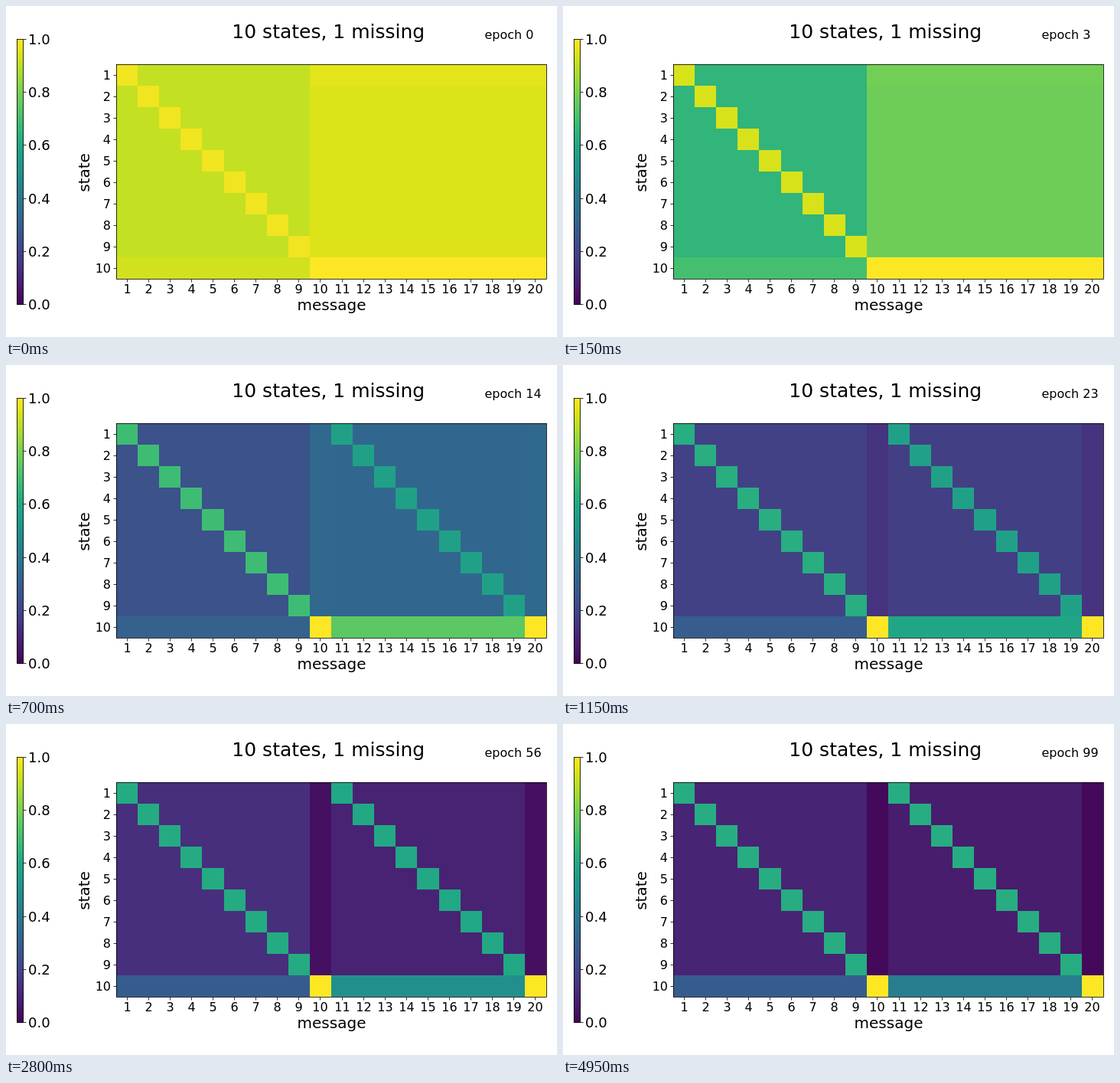
Recreate the animation shown at these times as an HTML page. Size 720 by 432 pixels, loop 5 s.

```html
<!DOCTYPE html>
<html lang="en">
<head>
<meta charset="utf-8">
<title>10 states, 1 missing</title>
<style>
  html, body { margin: 0; width: 100%; height: 100%; overflow: hidden; background: #fff; }
  svg { display: block; font-family: "DejaVu Sans", sans-serif; font-size: 16px; }
  .line { fill: none; stroke: #000; stroke-width: .8; }
  .mid { text-anchor: middle; }
  .end { text-anchor: end; }
  #cells { shape-rendering: crispEdges; }
</style>
</head>
<body>
<svg id="chart" width="720" height="432" viewBox="0 0 720 432">
  <defs><linearGradient id="scale" x1="0" y1="1" x2="0" y2="0"></linearGradient></defs>
  <rect x="14" y="43" width="9" height="347" fill="url(#scale)"/>
  <rect class="line" x="14.5" y="43.5" width="8" height="346"/>
  <g id="cells"></g>
  <rect class="line" x="144.5" y="76.5" width="562" height="280"/>
  <g id="axes"></g>
  <text class="mid" x="421.3" y="42" font-size="25">10 states, 1 missing</text>
  <text class="mid" x="425.5" y="397" font-size="20">message</text>
  <text class="mid" transform="translate(109 217.5) rotate(-90)" font-size="20">state</text>
  <text id="epoch" x="625.5" y="43"></text>
</svg>
<script>
const STEP = 50, EPOCHS = 100, ROWS = 10, COLS = 20;
const LEFT = 144, TOP = 76, CELL_W = 28.1, CELL_H = 28;

const viridis = ("440154 471365 482475 463480 414487 3b528b 355f8d 2f6c8e 2a788e 25848e 21918c " +
  "1e9c89 22a884 2fb47c 44bf70 5ec962 7ad151 9bd93c bddf26 dfe318 fde725").split(" ")
  .map(hex => [0, 2, 4].map(i => parseInt(hex.slice(i, i + 2), 16)));

// Value of each kind of cell at the key epochs
const keys = [0, 3, 5, 9, 14, 22, 41, 71, 99];
const curves = {
  leftDiag:  [.98, .94, .915, .81, .685, .625, .61, .612, .62],
  leftRest:  [.91, .655, .49, .325, .25, .195, .15, .122, .1],
  leftLast:  [.93, .7, .56, .38, .31, .293, .29, .29, .29],
  spare:     [.947, .778, .695, .52, .335, .16, .05, .035, .022],
  rightRest: [.947, .778, .695, .52, .33, .19, .115, .088, .078],
  rightDiag: [.947, .778, .695, .61, .57, .572, .587, .608, .62],
  rightLast: [1, 1, 1, .9, .745, .6, .522, .475, .42],
  full:      [1, 1, 1, 1, 1, 1, 1, 1, 1]
};

function color(v) {
  const p = Math.min(1, Math.max(0, v)) * (viridis.length - 1);
  const i = Math.min(viridis.length - 2, Math.floor(p));
  const mix = viridis[i].map((c, k) => Math.round(c + (viridis[i + 1][k] - c) * (p - i)));
  return `rgb(${mix})`;
}

// Monotone cubic through the key epochs
function sample(ys, x) {
  const last = keys.length - 1;
  const slope = i => (ys[i + 1] - ys[i]) / (keys[i + 1] - keys[i]);
  const tangent = i => {
    if (i === 0) return slope(0);
    if (i === last) return slope(last - 1);
    const a = slope(i - 1), b = slope(i);
    return a * b > 0 ? 2 * a * b / (a + b) : 0;
  };
  let i = 0;
  while (i < last - 1 && x >= keys[i + 1]) i++;
  const h = keys[i + 1] - keys[i], t = (x - keys[i]) / h, u = 1 - t;
  return ys[i] * (1 + 2 * t) * u * u + ys[i + 1] * t * t * (3 - 2 * t) +
    h * t * u * (tangent(i) * u - tangent(i + 1) * t);
}

function kindOf(row, col) {
  const lastRow = row === ROWS - 1;
  if (col % 10 === 9) return lastRow ? "full" : "spare";
  const side = col < 9 ? "left" : "right";
  if (lastRow) return side + "Last";
  return side + (col % 10 === row ? "Diag" : "Rest");
}

function add(parent, tag, attrs, text = "") {
  const el = document.createElementNS("http://www.w3.org/2000/svg", tag);
  for (const name in attrs) el.setAttribute(name, attrs[name]);
  el.textContent = text;
  return parent.appendChild(el);
}

const byId = id => document.getElementById(id);
const axes = byId("axes"), label = byId("epoch");
const tick = d => add(axes, "path", { class: "line", d });

viridis.forEach((c, i) => add(byId("scale"), "stop",
  { offset: i / (viridis.length - 1), "stop-color": `rgb(${c})` }));

for (let i = 0; i <= 5; i++) {
  const y = Math.floor(389 - i * 69.2 + .5) + .5;
  tick(`M23 ${y}h3.5`);
  add(axes, "text", { x: 29, y: y + 6.5, "font-size": 18 }, (i / 5).toFixed(1));
}
for (let c = 0; c < COLS; c++) {
  const x = Math.floor(LEFT + (c + .5) * CELL_W) + .5;
  tick(`M${x} 357v3.5`);
  add(axes, "text", { class: "mid", x, y: 375 }, c + 1);
}
for (let r = 0; r < ROWS; r++) {
  const y = TOP + (r + .5) * CELL_H + .5;
  tick(`M144 ${y}h-3.5`);
  add(axes, "text", { class: "end", x: 137, y: y + 5.5 }, r + 1);
}

const cells = [];
for (let row = 0; row < ROWS; row++) {
  for (let col = 0; col < COLS; col++) {
    const x = Math.round(LEFT + col * CELL_W), next = Math.round(LEFT + (col + 1) * CELL_W);
    const el = add(byId("cells"), "rect",
      { x, y: TOP + row * CELL_H, width: next - x, height: CELL_H });
    cells.push({ el, kind: kindOf(row, col), top: row === 0 && col > 8 });
  }
}

function draw(epoch) {
  const values = {};
  for (const kind in curves) values[kind] = sample(curves[kind], epoch);
  // The first state starts slightly higher on the right
  const lift = .01 * Math.max(0, 1 - epoch / 12);
  for (const { el, kind, top } of cells) {
    el.setAttribute("fill", color(values[kind] + (top ? lift : 0)));
  }
  label.textContent = "epoch " + epoch;
}

let shown = -1;
const start = performance.now();
function loop() {
  const epoch = Math.floor((performance.now() - start) / STEP) % EPOCHS;
  if (epoch !== shown) draw(shown = epoch);
  requestAnimationFrame(loop);
}
loop();
</script>
</body>
</html>
```
